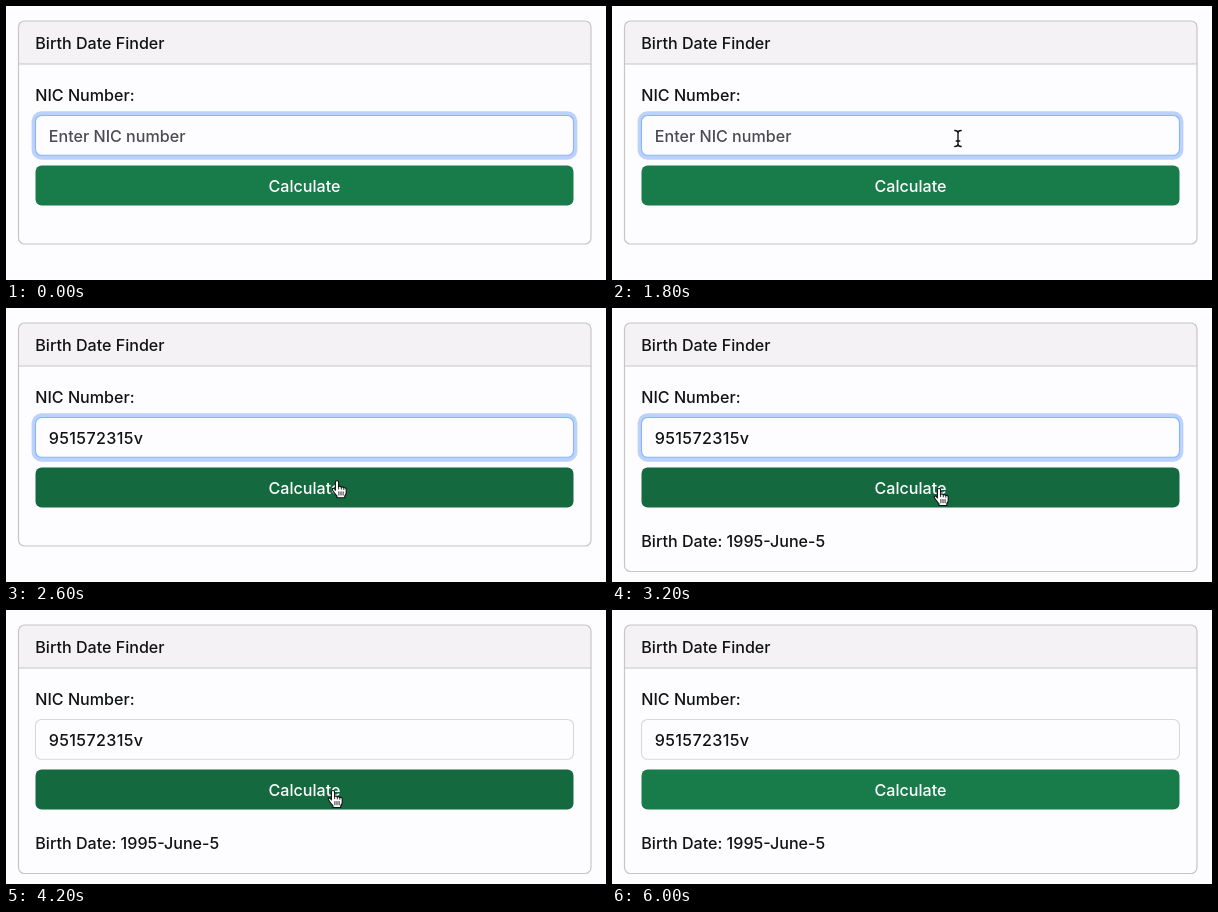
Write an HTML page that moves like this. It is 600x274 px and loops after 6600 ms.

```html
<!DOCTYPE html>
<html lang="en">
<head>
<meta charset="utf-8">
<title>Birth Date Finder</title>
<style>
  html, body { margin: 0; width: 100%; height: 100%; overflow: hidden; background: #fdfcfe; }
  svg { display: block; width: 100vw; height: 100vh; }
  text { font: 450 16.1px Inter, "Liberation Sans", sans-serif; fill: #111214; }
</style>
</head>
<body>
<svg viewBox="0 0 600 274">
  <rect width="600" height="274" fill="#fdfcfe"/>
  <path d="M12.5 58V21a6 6 0 0 1 6-6H579a6 6 0 0 1 6 6V58Z" fill="#f4f2f5"/>
  <path d="M12.5 58H585" stroke="#c6c5c8" stroke-width="1.2"/>
  <rect id="card" x="12.5" y="15" width="572.5" height="223" rx="6" fill="none" stroke="#c6c5c8" stroke-width="1.2"/>
  <text x="29.3" y="43">Birth Date Finder</text>
  <text x="29.3" y="94.5">NIC Number:</text>
  <rect id="ring" x="25.6" y="105.3" width="545.8" height="48.4" rx="10" fill="#bcd2fc"/>
  <rect id="field" x="29.5" y="109.5" width="538" height="39.8" rx="6" fill="#fdfcfe" stroke-width="1.1"/>
  <text id="value" x="42.8" y="135.5"></text>
  <rect id="caret" y="120" width="1.3" height="19" fill="#16171a"/>
  <rect id="button" x="29.5" y="159.5" width="538" height="40" rx="6.2"/>
  <text x="298.5" y="186" text-anchor="middle" style="fill:#fff">Calculate</text>
  <text id="result" x="29.3" y="239">Birth Date: 1995-June-5</text>
  <g id="arrow">
    <path d="M0 0V15L3.5 11.8L6 17.2L8.5 16L6.1 10.8H10.8Z" fill="#000" stroke="#fff" stroke-width="1.1"/>
  </g>
  <g id="beam" fill="none" stroke-linecap="round">
    <path d="M-3.2 -8Q0 -8 0 -5.5Q0 -8 3.2 -8M0 -5.5V5.5M-3.2 8Q0 8 0 5.5Q0 8 3.2 8M-1.8 2.5H1.8" stroke="#fff" stroke-width="3"/>
    <path d="M-3.2 -8Q0 -8 0 -5.5Q0 -8 3.2 -8M0 -5.5V5.5M-3.2 8Q0 8 0 5.5Q0 8 3.2 8M-1.8 2.5H1.8" stroke="#111" stroke-width="1.4"/>
  </g>
  <g id="hand" stroke="#111" stroke-linejoin="round" stroke-linecap="round">
    <path d="M-1.6 9.5V1.5Q-1.6 0 0 0T1.6 1.5V6Q3 4.8 4.3 6.4Q5.8 5.5 6.8 7Q9.2 6.4 9.2 9V12Q9.2 13.5 7.8 15V17H0V15.4Q-1.5 13.5 -3.4 11Q-5.4 8.4 -4.4 7.6Q-3.2 6.8 -1.6 9.5Z" fill="#fff" stroke-width="1.1"/>
    <path d="M1.6 6V8.2M4.3 6.4V8.4M6.8 7V8.8M1.9 11V14.3M4 11V14.3M6.1 11V14.3" fill="none" stroke-width=".9"/>
  </g>
</svg>
<script>
const LOOP = 6600, STEP = 100;
const PASTE = 2000, CLICK = 3200, LEAVE = 5400;
const $ = id => document.getElementById(id);
const set = (id, attrs) => {
  for (const name in attrs) $(id).setAttribute(name, attrs[name]);
};
const show = (id, on) => set(id, { visibility: on ? 'visible' : 'hidden' });

// Keys are [time, value, ...]; values run linearly between them.
function track(keys, t) {
  const i = keys.findIndex(k => k[0] > t);
  if (i === 0) return keys[0].slice(1);
  if (i < 0) return keys[keys.length - 1].slice(1);
  const a = keys[i - 1], b = keys[i];
  const p = (t - a[0]) / (b[0] - a[0]);
  return a.slice(1).map((v, n) => v + (b[n + 1] - v) * p);
}
const mix = (a, b, p) => `rgb(${a.map((v, i) => Math.round(v + (b[i] - v) * p))})`;

const path = [
  [100, 545, 264], [200, 482, 226], [300, 422, 182], [400, 376, 148],
  [500, 353, 136], [700, 346, 132.5], [2300, 346, 132.5], [2400, 342, 142],
  [2500, 334, 167], [2600, 331, 172.8], [3000, 327, 180.5]
];
const hover = [[200, 0], [300, .8], [500, 0], [2400, 0], [2600, 1], [5500, 1], [5700, 0]];
const focus = [[CLICK, 1], [CLICK + 200, 0]];

function draw(t) {
  const pasted = t >= PASTE, done = t >= CLICK;
  const [glow] = track(focus, t);
  const [dark] = track(hover, t);
  const [x, y] = track(path, t);

  set('card', { height: done ? 248.5 : 223 });
  show('result', done);
  set('ring', { opacity: glow });
  set('field', { stroke: mix([217, 217, 221], [134, 182, 252], glow) });
  set('button', { fill: mix([24, 124, 74], [20, 105, 63], dark) });

  $('value').textContent = pasted ? '951572315v' : 'Enter NIC number';
  $('value').style.fill = pasted ? '#111214' : '#4b4c51';
  $('value').style.letterSpacing = pasted ? '.35px' : '0';
  set('caret', { x: pasted ? 138 : 43.5 });
  show('caret', (t >= 1100 && t < 1800) || (pasted && t < 2500));

  const inside = (top, bottom) => x > 29 && x < 568 && y > top && y < bottom;
  const kind = inside(109, 150) ? 'beam' : inside(159, 200) ? 'hand' : 'arrow';
  const seen = t >= 100 && t < LEAVE;
  for (const id of ['arrow', 'beam', 'hand']) {
    set(id, { transform: `translate(${x} ${y})` });
    show(id, seen && id === kind);
  }
}

const start = performance.now();
function tick() {
  const t = (performance.now() - start) % LOOP;
  draw(Math.floor(t / STEP) * STEP);
  requestAnimationFrame(tick);
}
tick();
</script>
</body>
</html>
```
